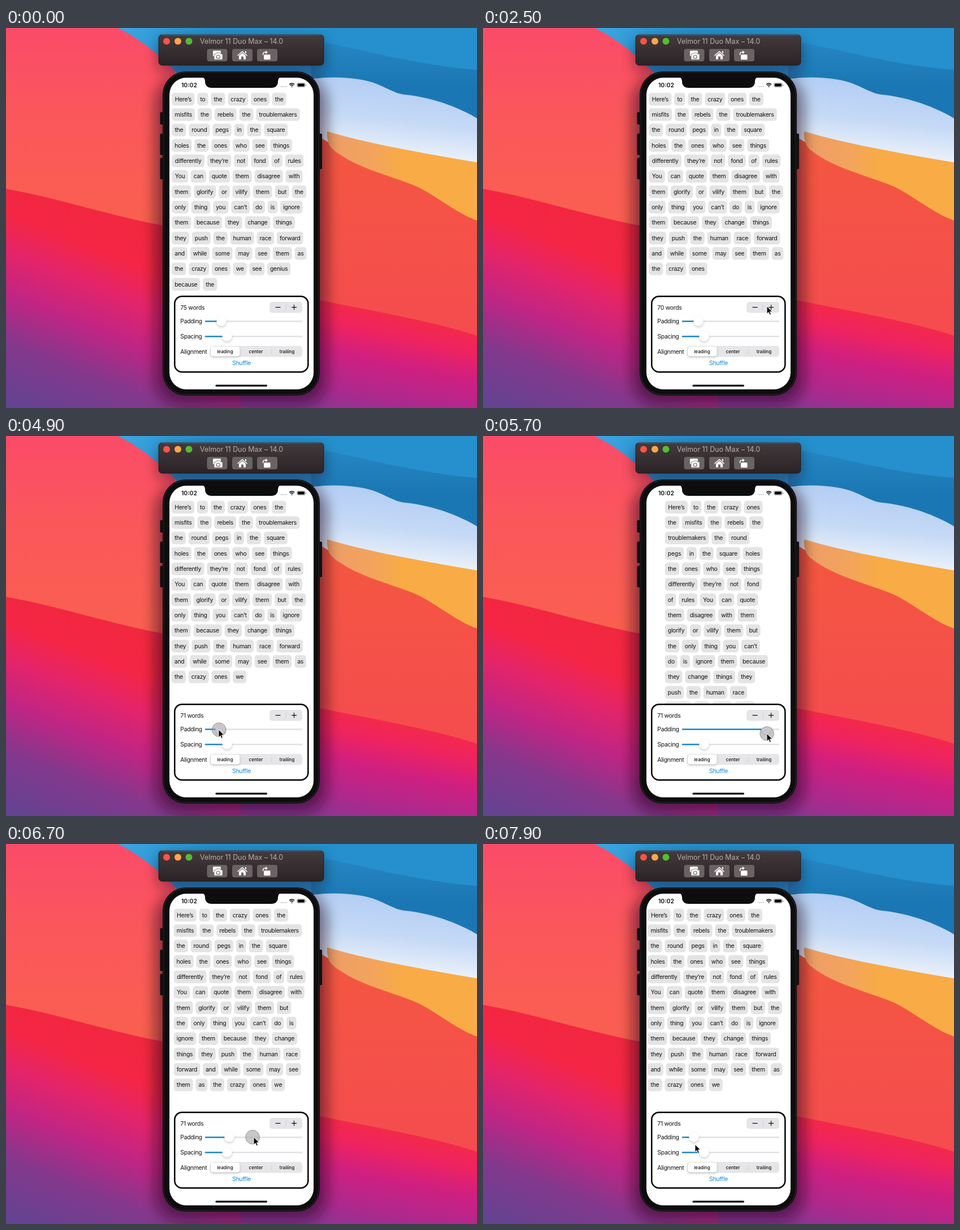
An HTML page for the animation above (8000 ms loop, 833 by 673 pixels).

```html
<!DOCTYPE html>
<html lang="en">
<head>
<meta charset="utf-8">
<title>Word flow layout</title>
<style>
  html, body { margin: 0; width: 100%; height: 100%; overflow: hidden; }
  svg { display: block; width: 833px; height: 673px; }
  text { font: 10.47px Inter, Roboto, sans-serif; letter-spacing: -.3px; fill: #111; }
  .mid { text-anchor: middle; }
  #title { font-size: 12.4px; letter-spacing: 0; fill: #b8afb1; }
  .seg { font-size: 8.1px; letter-spacing: 0; font-weight: 500; }
  .line { fill: none; stroke: #111; stroke-width: 1.2; }
</style>
</head>
<body>
<svg viewBox="0 0 833 673">
  <defs>
    <linearGradient id="coral" x2="0" y2="1">
      <stop stop-color="#fb4b68"/><stop offset=".25" stop-color="#fa585a"/><stop offset=".5" stop-color="#fa5f50"/>
    </linearGradient>
    <linearGradient id="dusk" gradientUnits="userSpaceOnUse" x1="140" y1="320" x2="-8" y2="692">
      <stop stop-color="#f22740"/><stop offset=".15" stop-color="#f42645"/><stop offset=".3" stop-color="#e4246a"/>
      <stop offset=".48" stop-color="#c02584"/><stop offset=".68" stop-color="#83388c"/><stop offset="1" stop-color="#5a4694"/>
    </linearGradient>
    <linearGradient id="berry" gradientUnits="userSpaceOnUse" x1="650" y1="500" x2="612" y2="686">
      <stop stop-color="#f4294a"/><stop offset=".2" stop-color="#ee2360"/><stop offset=".45" stop-color="#d01f80"/>
      <stop offset=".75" stop-color="#b0288c"/><stop offset="1" stop-color="#8c3592"/>
    </linearGradient>
    <linearGradient id="red" x2="0" y2="1">
      <stop stop-color="#f4583f"/><stop offset="1" stop-color="#f54b50"/>
    </linearGradient>
    <linearGradient id="sky" gradientUnits="userSpaceOnUse" x1="210" y1="0" x2="300" y2="80">
      <stop stop-color="#3ba5e1"/><stop offset="1" stop-color="#2590cd"/>
    </linearGradient>
    <linearGradient id="deep" x2="0" y2="1">
      <stop stop-color="#2587c4"/><stop offset=".5" stop-color="#1b77b3"/>
    </linearGradient>
    <linearGradient id="mist" x1=".6" x2=".4" y2="1">
      <stop stop-color="#b0cbf4"/><stop offset=".5" stop-color="#c6daf6"/><stop offset=".9" stop-color="#eef3fa"/>
    </linearGradient>
    <linearGradient id="amber">
      <stop stop-color="#ee9d68"/><stop offset=".3" stop-color="#f2a45c"/><stop offset=".5" stop-color="#f9ab46"/>
    </linearGradient>
    <linearGradient id="chrome" x2="0" y2="1">
      <stop stop-color="#443a3c"/><stop offset="1" stop-color="#2a2326"/>
    </linearGradient>
    <filter id="soft" x="-30%" y="-30%" width="160%" height="160%"><feGaussianBlur stdDeviation="12"/></filter>
    <filter id="lift" x="-50%" y="-50%" width="200%" height="200%">
      <feDropShadow dx="0" dy="2" stdDeviation="2" flood-opacity=".22"/>
    </filter>
  </defs>

  <g id="wallpaper">
    <rect width="833" height="673" fill="url(#coral)"/>
    <path fill="url(#dusk)" d="M0 285C90 300 190 335 290 352L420 390V673H0Z"/>
    <path fill="url(#sky)" d="M198 0C238 20 280 52 330 110H833V0Z"/>
    <path fill="url(#deep)" d="M540 22C620 34 720 66 833 74V180H540Z"/>
    <path fill="url(#red)" d="M415 170H833V560H415Z"/>
    <path fill="url(#berry)" d="M415 455C640 500 740 515 833 545V673H415Z"/>
    <path fill="url(#mist)" d="M540 90C575 86 600 87 625 91C665 97 680 115 705 118C750 122 800 140 833 160V242H640L540 185Z"/>
    <path fill="url(#amber)" d="M568 183C640 205 740 222 833 238V341C790 325 760 295 720 278C680 262 610 245 575 212Q566 200 568 183Z"/>
  </g>

  <g fill="#180a18" filter="url(#soft)">
    <rect x="268" y="20" width="296" height="58" rx="10" opacity=".4"/>
    <rect x="264" y="86" width="304" height="582" rx="46" opacity=".5"/>
  </g>

  <g id="toolbar">
    <rect x="270" y="12" width="292" height="54" rx="6" fill="url(#chrome)" stroke="#1b1416" stroke-width=".8"/>
    <path d="M275 12.8H557" stroke="#75696c" stroke-width=".8"/>
    <circle cx="284" cy="23.5" r="6" fill="#fb5349"/>
    <circle cx="304" cy="23.5" r="6" fill="#f8a84a"/>
    <circle cx="323.5" cy="23.5" r="6" fill="#4fc02f"/>
    <text id="title" x="343" y="28">Velmor 11 Duo Max – 14.0</text>
    <g fill="#6b6264">
      <rect x="355.500" y="37" width="36" height="22" rx="4"/>
      <rect x="400" y="37" width="36" height="22" rx="4"/>
      <rect x="444" y="37" width="36" height="22" rx="4"/>
    </g>
    <g fill="#fff">
      <rect x="366" y="40" width="14" height="10" rx="1.5"/>
      <path d="M368 46H371L372.500 44H378L379.500 46H383V56H368Z" stroke="#6b6264" stroke-width=".8"/>
      <circle cx="375.300" cy="51" r="3" fill="none" stroke="#6b6264" stroke-width="1.2"/>
      <path d="M409 48.500L418 40.500L427 48.500L426 49.500L418 42.600L410 49.500ZM423 41H425V45L423 43.500ZM412 49L418 44L424 49V55.500H420V50.500H416V55.500H412Z"/>
      <rect x="456" y="47" width="11.500" height="9" rx="1.5"/>
      <path d="M454.500 48V46Q454.500 43 458 43H460" fill="none" stroke="#fff" stroke-width="1.5"/>
      <path d="M459 40L463 43L459 46Z"/>
    </g>
  </g>

  <g id="phone">
    <g fill="#111">
      <rect x="272.500" y="149" width="8" height="22" rx="2"/>
      <rect x="272.500" y="187" width="8" height="38" rx="2"/>
      <rect x="272.500" y="230" width="8" height="38" rx="2"/>
      <rect x="551" y="187" width="8" height="63" rx="2"/>
    </g>
    <rect x="277" y="77" width="278" height="574" rx="41" fill="#0d0d0e"/>
    <rect x="279" y="79" width="274" height="570" rx="39" fill="none" stroke="#2b2b2d"/>
    <rect x="289" y="88" width="255" height="552" rx="30" fill="#fff"/>
    <path fill="#0d0d0e" d="M346 87Q352 88 352 94Q352 106 364 106H469Q481 106 481 94Q481 88 487 87Z"/>
    <text class="mid" x="324" y="105" style="font-weight:600;letter-spacing:0">10:02</text>
    <path d="M486 103.800H497" stroke="#aaa" stroke-width="1.5" stroke-dasharray="1.6 1.4"/>
    <g fill="none" stroke="#000" stroke-width="1.5">
      <path d="M501 100Q505.500 96 510 100M502.800 102Q505.500 99.600 508.200 102"/>
      <path d="M504.500 103.800H506.500"/>
    </g>
    <rect x="514.600" y="97.500" width="14.500" height="7" rx="2" fill="#fff" stroke="#777" stroke-width=".7"/>
    <rect x="515.800" y="98.600" width="12.100" height="4.800" rx="1"/>
    <path d="M530.400 99.800V102.200" stroke="#777"/>
    <g id="chips"></g>
    <rect x="370.500" y="631.800" width="91.500" height="3.200" rx="1.600"/>
  </g>

  <g id="panel">
    <rect x="298.300" y="475.200" width="236" height="134" rx="13" fill="#fff" stroke="#000" stroke-width="2.500"/>
    <text id="count" x="308.300" y="498.500"></text>
    <rect x="466" y="485" width="58" height="19.500" rx="5" fill="#e5e5e7"/>
    <path id="minusDown" d="M471 485H495V504.500H471Q466 504.500 466 499.500V490Q466 485 471 485Z" fill="#b8bec4"/>
    <path id="plusDown" d="M495 485H519Q524 485 524 490V499.500Q524 504.500 519 504.500H495Z" fill="#b8bec4"/>
    <path d="M495 490V500" stroke="#c9c9cc" stroke-width=".8"/>
    <path class="line" d="M476.500 494.700H485.500M505 494.700H514M509.500 490.200V499.200"/>
    <text x="308.300" y="523.200">Padding</text>
    <text x="308.300" y="549.800">Spacing</text>
    <text x="308.300" y="576.500">Alignment</text>
    <g stroke-width="2.500" stroke-linecap="round">
      <path d="M353 519.500H523M353 546.200H523" stroke="#e1e1e3"/>
      <path id="padFill" stroke="#1c88d3"/>
      <path d="M353 546.200H391" stroke="#1c88d3"/>
    </g>
    <circle id="padThumb" cy="519" r="8.600" fill="#fff" filter="url(#lift)"/>
    <circle cx="391" cy="546" r="8.600" fill="#fff" filter="url(#lift)"/>
    <rect x="361" y="563" width="163" height="19.500" rx="5" fill="#e6e6e8"/>
    <rect x="362.200" y="564.200" width="51" height="17" rx="4" fill="#fff" filter="url(#lift)"/>
    <path d="M469.500 568V578" stroke="#cfcfd2" stroke-width=".8"/>
    <text class="mid seg" x="387.500" y="576">leading</text>
    <text class="mid seg" x="442" y="576">center</text>
    <text class="mid seg" x="497" y="576">trailing</text>
    <text class="mid" x="416.500" y="597.300" style="fill:#1486d8">Shuffle</text>
  </g>

  <circle id="touch" r="12.300" fill="#9a9aa2" fill-opacity=".55" stroke="#777" stroke-opacity=".7"/>
  <path id="cursor" d="M0 0V13.500L3.100 10.700L5.200 15.400L7.500 14.400L5.400 9.800H9.600Z" stroke="#fff" stroke-width=".9"/>
</svg>

<script>
const LOOP = 8000, STEP = 100;
const UNIT = 0.616;               // stage pixels per point of the phone screen
const GAP = 8 * UNIT, INSET = 8 * UNIT, CHIP_H = 22.4;
const SCREEN_MID = 416.5, TOP = 126;

const words = `Here’s to the crazy ones the misfits the rebels the troublemakers
the round pegs in the square holes the ones who see things differently they’re not
fond of rules You can quote them disagree with them glorify or vilify them but the
only thing you can’t do is ignore them because they change things they push the
human race forward and while some may see them as the crazy ones we see genius
because the`.split(/\s+/);

// Advance of each letter in thousandths of the font size
const advance = {
  a: 560, b: 611, c: 571, d: 611, e: 582, f: 368, g: 611, h: 590, i: 242, k: 550,
  l: 242, m: 874, n: 590, o: 598, p: 611, q: 611, r: 370, s: 528, t: 361, u: 590,
  v: 563, w: 819, y: 563, z: 550, H: 744, Y: 680, "’": 240
};
const chipWidth = word =>
  [...word].reduce((sum, c) => sum + advance[c] * 0.01047 - 0.3, 2 * INSET);

const $ = id => document.getElementById(id);
const show = (node, on) => node.setAttribute("display", on ? "inline" : "none");
const set = (node, attrs) => {
  for (const key in attrs) node.setAttribute(key, attrs[key]);
  return node;
};
const add = (parent, tag, attrs) =>
  parent.appendChild(set(document.createElementNS("http://www.w3.org/2000/svg", tag), attrs));

const chips = words.map(word => {
  const width = chipWidth(word);
  const node = add($("chips"), "g", {});
  add(node, "rect", { y: -CHIP_H / 2, width, height: CHIP_H, rx: 5, fill: "#e4e4e5" });
  add(node, "text", { x: width / 2, y: 3.8, class: "mid" }).textContent = word;
  return { node, width };
});

const minusTaps = [500, 900, 1250, 1600, 1950];
const plusTaps = [2900];
const TAP = 160;
const drag = [4700, 7500];

// [time, x, y]
const pointerPath = [
  [100, 620, 690], [450, 486, 490], [1300, 485, 488], [2100, 485, 489], [2700, 508, 494],
  [3200, 508, 494], [3700, 506, 500], [4050, 500, 504], [4600, 379, 519], [4900, 376, 520],
  [5050, 380, 521], [5700, 502, 527], [6250, 506, 526], [6700, 438, 519], [7100, 370, 524],
  [7500, 374, 526], [7900, 375, 532]
];
const thumbPath = [
  [4700, 381], [4900, 379], [5050, 383], [5700, 501], [6200, 506],
  [6700, 395], [7000, 369], [7400, 373]
];

function along(path, t, axis = 1) {
  const next = path.findIndex(key => key[0] > t);
  if (next < 0) return path[path.length - 1][axis];
  if (next === 0) return path[0][axis];
  const a = path[next - 1], b = path[next];
  const k = (t - a[0]) / (b[0] - a[0]);
  return a[axis] + (b[axis] - a[axis]) * k * k * (3 - 2 * k);
}

function layout(count, left) {
  const limit = 2 * (SCREEN_MID - left) - 0.7;
  let x = 0, row = 0;
  chips.forEach(({ node, width }, i) => {
    show(node, i < count);
    if (x + width + GAP > limit) { x = 0; row++; }
    set(node, { transform: `translate(${left + x} ${TOP + row * (CHIP_H + GAP)})` });
    x += width + GAP;
  });
}

function render(t) {
  const done = taps => taps.filter(start => t >= start).length;
  const held = taps => taps.some(start => t >= start && t < start + TAP);
  const minus = held(minusTaps), plus = held(plusTaps);
  const count = words.length - done(minusTaps) + done(plusTaps);
  const thumb = along(thumbPath, t);

  layout(count, 293.4 + (thumb - 381) * 0.238);
  $("count").textContent = `${count} words`;
  show($("minusDown"), minus);
  show($("plusDown"), plus);
  set($("padThumb"), { cx: thumb });
  set($("padFill"), { d: `M353 519.5H${thumb}` });

  const place = (node, time) => set(node, {
    transform: `translate(${along(pointerPath, time)} ${along(pointerPath, time, 2)})`
  });
  place($("cursor"), t);
  place($("touch"), t + 40);
  show($("cursor"), t > 0);
  show($("touch"), minus || plus || (t >= drag[0] && t < drag[1]));
}

const began = performance.now();
function tick() {
  const t = (performance.now() - began) % LOOP;
  render(Math.floor(t / STEP) * STEP);
  requestAnimationFrame(tick);
}
render(0);
requestAnimationFrame(tick);
</script>
</body>
</html>
```
